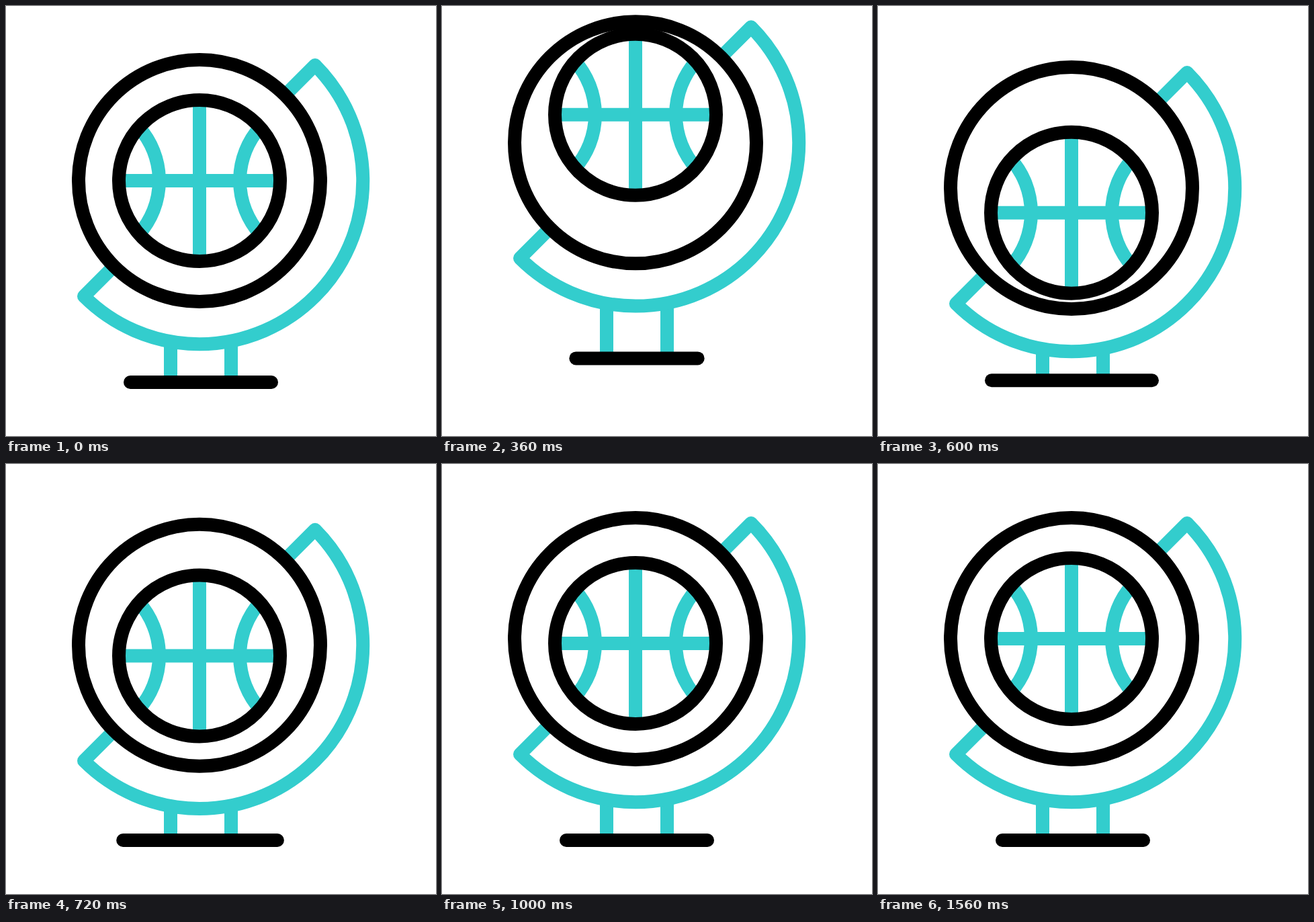
An HTML page for the animation above (2000 ms loop, 640 px wide and 640 px high).

```html
<!DOCTYPE html>
<html>
<head>
<meta charset="utf-8">
<style>
  html, body { margin: 0; height: 100%; overflow: hidden; background: #fff; }
  svg { display: block; width: 100vw; height: 100vh; }
  .teal { stroke: #33cdcd; }
</style>
</head>
<body>
<svg viewBox="0 0 640 640" fill="none" stroke="#000" stroke-width="20" stroke-linejoin="round">
  <path id="legs" class="teal"/>
  <path id="base" stroke-linecap="round"/>
  <g id="stand">
    <path class="teal" d="M116 432L460 88A243 243 0 0 1 116 432Z"/>
    <circle cx="288" cy="260" r="180" fill="#fff"/>
    <g id="ball">
      <circle cx="288" cy="260" r="120" fill="#fff" stroke="none"/>
      <path class="teal" d="M288 140V380M168 260H408M197.4 180A120 120 0 0 1 197.4 340M378.6 180A120 120 0 0 0 378.6 340"/>
      <circle cx="288" cy="260" r="120"/>
    </g>
  </g>
</svg>
<script>
  const LOOP = 2000, STEP = 40;
  const START = 120, TOP = 400, LAND = 640, SETTLE = 820, END = 1560;
  const HALF_SWING = 234;
  const $ = id => document.getElementById(id);

  function ease(t, from, to) {
    const p = Math.min(1, Math.max(0, (t - from) / (to - from)));
    return p * p * (3 - 2 * p);
  }

  // Rises from 0 to 1 at the peak and falls back to 0
  const pulse = (t, from, peak, to) => ease(t, from, peak) - ease(t, peak, to);

  // The ball bounces steadily inside the ring, then snaps back to rest
  function bounce(t) {
    if (t < TOP) return -44 * ease(t, START, TOP);
    if (t >= END) return 0;
    return -1.5 - 42.5 * Math.cos(Math.PI * (t - TOP) / HALF_SWING);
  }

  function draw(t) {
    const jump = pulse(t, START, TOP, LAND);
    const squash = pulse(t, TOP, LAND, SETTLE);
    const lift = 16.7 * squash - 60 * jump;
    const y = 560 - 37.7 * jump;
    const left = 185 + 15.2 * jump - 18.5 * squash;
    const right = 395 - 15.2 * jump + 15.2 * squash;
    $('stand').setAttribute('transform', `translate(0 ${lift})`);
    $('ball').setAttribute('transform', `translate(0 ${bounce(t)})`);
    $('legs').setAttribute('d', `M245 ${496 + lift}V${y}M335 ${496 + lift}V${y}`);
    $('base').setAttribute('d', `M${left} ${y}H${right}`);
  }

  const start = performance.now();
  function tick() {
    const t = (performance.now() - start) % LOOP;
    draw(Math.floor(t / STEP) * STEP);
    requestAnimationFrame(tick);
  }
  tick();
</script>
</body>
</html>
```
